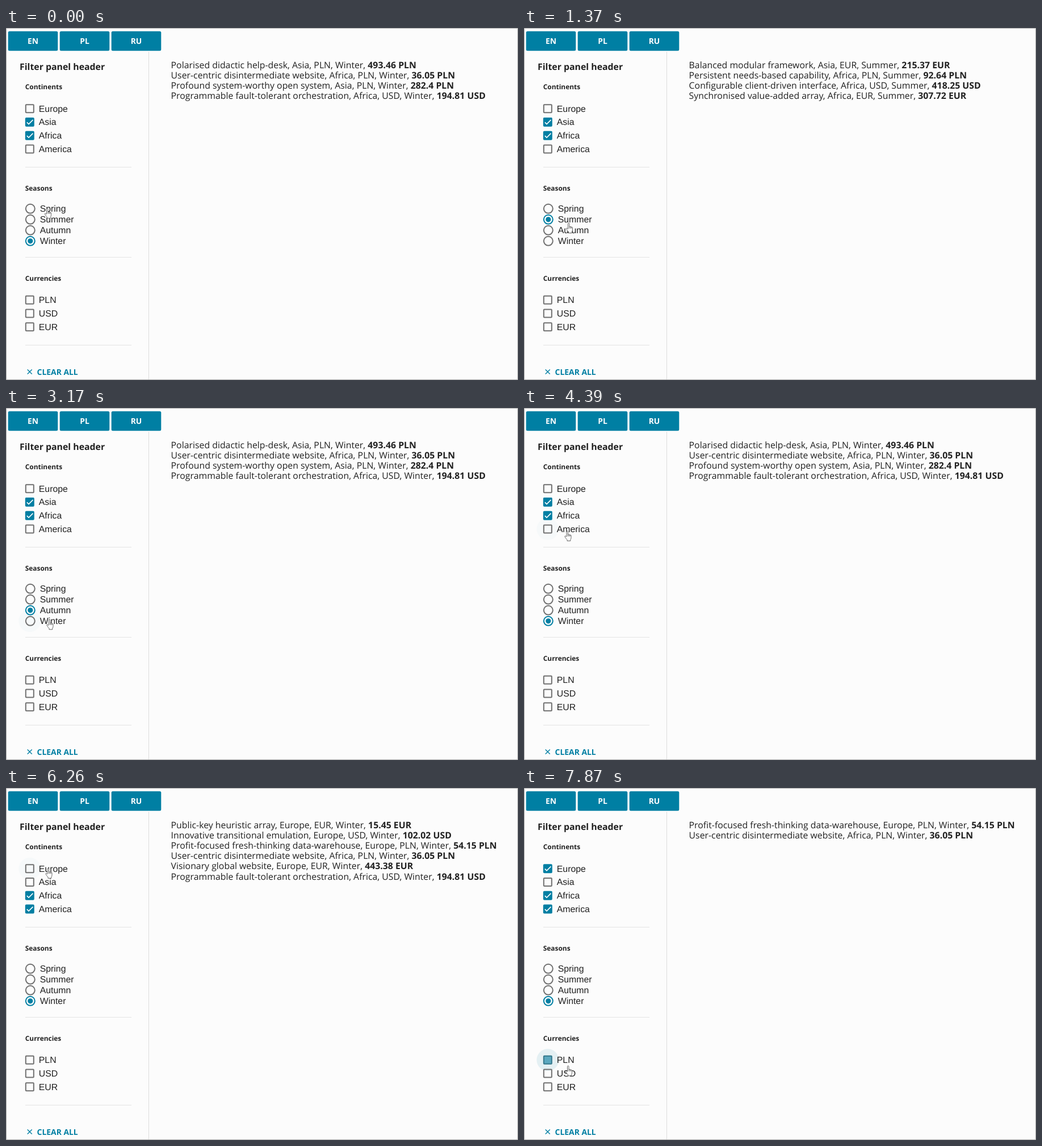
Recreate the animation shown at these times as an HTML page. Size 902 by 621 pixels, loop 8000 ms.

```html
<!DOCTYPE html>
<html lang="en">
<head>
<meta charset="utf-8">
<title>Filter panel</title>
<style>
  html, body { margin: 0; width: 100%; height: 100%; overflow: hidden; background: #fcfcfc; }
  svg { display: block; }
  text { font: 15.84px "Open Sans", sans-serif; fill: #212121; text-rendering: geometricPrecision; }
  .bold, .title, .btn, .clear { font-weight: 700; }
  .head { font-size: 11.9px; font-weight: 700; }
  .btn { font-size: 13.9px; fill: #fff; text-anchor: middle; }
  .clear { font-size: 13.9px; fill: #007fa3; }
  .label { font-family: "Liberation Sans", Arial, sans-serif; }
  .tick { fill: none; stroke: #fff; stroke-width: 1.6; }
</style>
</head>
<body>
<svg id="stage" width="902" height="621" viewBox="0 0 902 621"></svg>
<script>
const LOOP = 8000, TRAVEL = 200;
const BLUE = '#007fa3', GREY = '#707070', PALE = '#5ba8bf', DEEP = '#35788c';
const stage = document.getElementById('stage');

const groups = {
  Continents: ['Europe', 'Asia', 'Africa', 'America'],
  Seasons: ['Spring', 'Summer', 'Autumn', 'Winter'],
  Currencies: ['PLN', 'USD', 'EUR']
};

const products = `
Networked impactful focus group, Asia, USD, Spring, 343.01
Organized demand-driven policy, Asia, PLN, Spring, 146.36
Multi-layered intangible attitude, Africa, USD, Spring, 541.59
Monitored multi-tasking policy, Asia, EUR, Spring, 48.86
Compatible upward-trending productivity, Africa, EUR, Spring, 678.11
Balanced modular framework, Asia, EUR, Summer, 215.37
Persistent needs-based capability, Africa, PLN, Summer, 92.64
Configurable client-driven interface, Africa, USD, Summer, 418.25
Synchronised value-added array, Africa, EUR, Summer, 307.72
Optional 4th generation success, Africa, PLN, Autumn, 653.14
Optional object-oriented functionalities, Africa, PLN, Autumn, 24.46
Integrated holistic knowledge base, Asia, PLN, Autumn, 767.87
Innovative foreground hierarchy, Africa, EUR, Autumn, 685.98
Adaptive secondary monitoring, Africa, EUR, Autumn, 529.86
Polarised didactic help-desk, Asia, PLN, Winter, 493.46
Public-key heuristic array, Europe, EUR, Winter, 15.45
Innovative transitional emulation, Europe, USD, Winter, 102.02
Profit-focused fresh-thinking data-warehouse, Europe, PLN, Winter, 54.15
User-centric disintermediate website, Africa, PLN, Winter, 36.05
Profound system-worthy open system, Asia, PLN, Winter, 282.4
Visionary global website, Europe, EUR, Winter, 443.38
Programmable fault-tolerant orchestration, Africa, USD, Winter, 194.81
`.trim().split('\n').map(row => row.split(', '));

const clicks = [
  ['Spring', 70], ['Summer', 1050], ['Autumn', 2050], ['Winter', 3170],
  ['America', 4390], ['Asia', 5290], ['Europe', 6260], ['PLN', 7770]
];

// Pointer stops: start of the move, row, x, offset from the row
const stops = [
  [-TRAVEL, 'Spring', 67.5, -1], [420, 'Summer', 74, 4], [1320, 'Autumn', 71, -3],
  [2310, 'Winter', 71, -3], [3500, 'America', 71, 3], [4520, 'Asia', 65, -1],
  [5710, 'Europe', 69, -1], [7080, 'PLN', 73, -2], [7670, 'PLN', 72.5, 10]
];

const text = (cls, x, y, s) => `<text class="${cls}" x="${x}" y="${y}">${s}</text>`;
const rect = (x, y, w, h, fill, r = 0) =>
  `<rect x="${x}" y="${y}" width="${w}" height="${h}" rx="${r}" fill="${fill}"/>`;
const button = (s, i) => {
  const x = 4 + i * 91;
  return rect(x - .3, 5.7, 87.6, 34.6, BLUE, 2.5) + text('btn', x + 43.5, 28, s);
};
const ripple = y => `<circle cx="41.8" cy="${y}" r="19.5" fill="${BLUE}"/>`;
const checkbox = (name, y) => `<g id="${name}">${ripple(0)}
  <rect x="34.8" y="-7" width="14" height="14" rx="1" stroke-width="2"/>
  <path class="tick"/>${text('label', 57.8, 5.3, name)}</g>`;
const radio = name => `<g id="${name}">${ripple(0)}
  <circle cx="42.8" r="8" fill="none" stroke-width="2"/><circle cx="42.8" fill="${BLUE}"/>
  ${text('label', 59.7, 5.6, name)}</g>`;

const rowY = {};
function panel() {
  let y = 108, out = '';
  for (const [title, names] of Object.entries(groups)) {
    const single = title === 'Seasons', step = single ? 19 : 23.76;
    out += text('head', 33.8, y, title);
    y += single ? 32.2 : 34.2;
    names.forEach((name, i) => {
      rowY[name] = y + i * step;
      out += `<g transform="translate(0 ${rowY[name]})">${single ? radio(name) : checkbox(name)}</g>`;
    });
    y += (names.length - 1) * step + (single ? 28.4 : 31.7);
    out += rect(34, Math.round(y), 187, 1, '#e4e4e4');
    y += 41.4;
  }
  return out;
}

stage.innerHTML =
  rect(0, 0, 902, 621, '#fcfcfc') +
  '<rect x=".5" y=".5" width="901" height="620" fill="none" stroke="#a8a8a8"/>' +
  rect(251, 42, 1, 578, '#dcdcdc') +
  ['EN', 'PL', 'RU'].map(button).join('') +
  text('title', 24.1, 74.2, 'Filter panel header') +
  panel() +
  `<path d="M37.7 602.5l8 8m0-8l-8 8" stroke="${BLUE}" stroke-width="1.4"/>` +
  text('clear', 54.6, 611.5, 'CLEAR ALL') +
  '<g id="results"></g>' +
  `<path id="hand" fill="#fff" stroke="#555" stroke-width=".9" stroke-linejoin="round"
    d="M4 10.5V1.6a1.2 1.2 0 0 1 2.4 0V6.6q1.2-.8 2 .4q1.2-.6 1.8 .5q1.6-.4 1.8 1V12q0 2.5-1.2 4V18H5V16C3.5 14.5 1.5 12 .8 10q.6-1.6 2-.2L4 11M6.4 6.6V10M8.4 7V10M10.2 7.5V10"/>`;

const byId = id => document.getElementById(id);
const clamp = v => Math.max(0, Math.min(1, v));

// Names selected once every click up to t has been handled
function pickedAt(t) {
  const picked = new Set(['Asia', 'Africa', 'Winter']);
  for (const [name, time] of clicks) {
    if (time > t) break;
    if (groups.Seasons.includes(name)) {
      groups.Seasons.forEach(s => picked.delete(s));
      picked.add(name);
    } else if (!picked.delete(name)) picked.add(name);
  }
  return picked;
}

function drawBox(name, t) {
  const [, square, tick] = byId(name).children;
  const was = pickedAt(t - 240).has(name);
  const on = pickedAt(was ? t : t - 60).has(name);
  const busy = was !== on;
  square.setAttribute('fill', busy ? PALE : on ? BLUE : 'none');
  square.setAttribute('stroke', busy ? DEEP : on ? BLUE : GREY);
  tick.setAttribute('d', !was && (busy || !on) ? '' : busy ? 'M38 3.8l8-8' : on ? 'M36.8 .4l3.2 3.2l7.4-7.4' : '');
}

function drawRadio(name, t) {
  const [, ring, dot] = byId(name).children;
  const was = pickedAt(t - 260).has(name), on = pickedAt(t - 60).has(name);
  const scale = (was + on) / 2;
  ring.setAttribute('stroke', scale ? BLUE : GREY);
  dot.setAttribute('r', 4.6 * scale);
}

function drawRipple(name, time, t) {
  const p = clamp((t - time + 20) / 300);
  byId(name).children[0].setAttribute('opacity', .1 * Math.sin(Math.PI * p));
}

let shown = '';
function drawResults(picked) {
  const open = names => !names.some(n => picked.has(n));
  const pass = (group, value) => picked.has(value) || open(groups[group]);
  const html = products
    .filter(([, place, money, season]) =>
      pass('Continents', place) && pass('Currencies', money) && pass('Seasons', season))
    .map(([name, place, money, season, price], i) => text('', 290.6, 70.55 + i * 18.2,
      `${name}, ${place}, ${money}, ${season}, <tspan class="bold">${price} ${money}</tspan>`))
    .join('');
  if (html !== shown) byId('results').innerHTML = shown = html;
}

function drawHand(t) {
  let x = 0, y = 0;
  for (const [start, row, toX, dy] of stops) {
    const p = clamp((t - start) / TRAVEL), k = p * p * (3 - 2 * p);
    x += (toX - x) * k;
    y += (rowY[row] + dy - y) * k;
  }
  byId('hand').setAttribute('transform', `translate(${x} ${y})`);
}

function draw(t) {
  [...groups.Continents, ...groups.Currencies].forEach(name => drawBox(name, t));
  groups.Seasons.forEach(name => drawRadio(name, t));
  clicks.forEach(([name, time]) => drawRipple(name, time, t));
  drawResults(pickedAt(t));
  drawHand(t);
}

for (const name of Object.keys(rowY)) byId(name).children[0].setAttribute('opacity', 0);
const began = performance.now();
function frame() {
  draw((performance.now() - began) % LOOP);
  requestAnimationFrame(frame);
}
frame();
</script>
</body>
</html>
```
